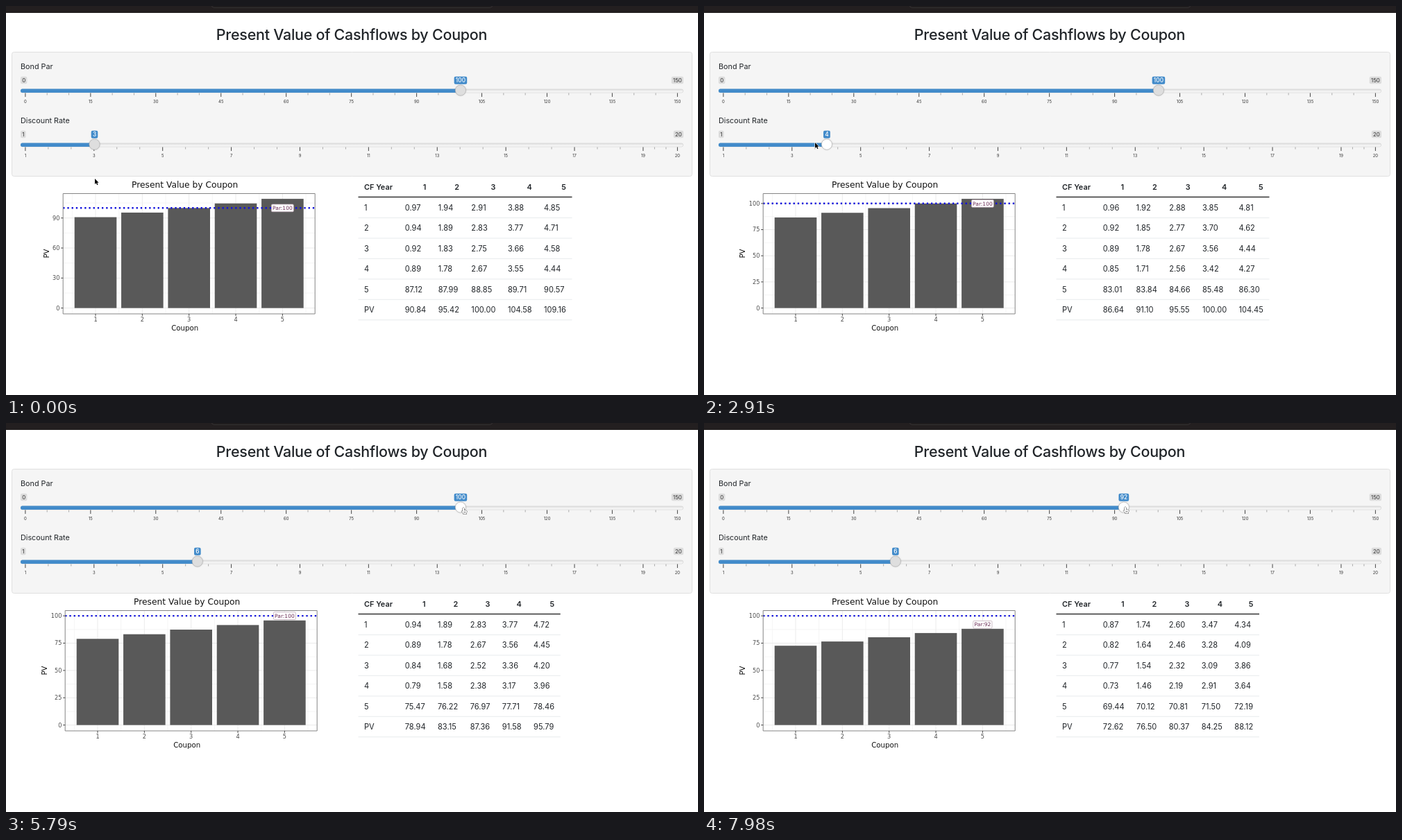
Write an HTML page with a canvas that moves like this. It is 997 px wide and 561 px high and loops after 8000 ms.

```html
<!DOCTYPE html>
<html lang="en">
<head>
<meta charset="utf-8">
<title>Present Value of Cashflows by Coupon</title>
<style>
html, body { margin: 0; width: 100%; height: 100%; overflow: hidden; background: #fff; }
canvas { display: block; width: 997px; height: 561px; }
</style>
</head>
<body>
<canvas></canvas>
<script>
const W = 997, H = 561, LOOP = 8000;
const SANS = 'Inter, sans-serif', PLOT = '"DejaVu Sans", sans-serif';
const BLUE = '#428bca';
const canvas = document.querySelector('canvas');
const ctx = canvas.getContext('2d');
const ratio = window.devicePixelRatio || 1;
canvas.width = Math.round(W * ratio);
canvas.height = Math.round(H * ratio);

// Cursor tip: time, x, y
const cursorPath = [
  [510, 128, 249], [1260, 132, 198], [1530, 133, 199], [1890, 133, 199],
  [2070, 155, 197], [2250, 160, 197], [2910, 160, 197], [3510, 217, 200],
  [4080, 217, 200], [4380, 262, 199], [4710, 262, 199], [5490, 655, 124],
  [5790, 658, 121], [6060, 658, 121], [6300, 620, 120], [7020, 620, 120],
  [7440, 609, 120], [7910, 609, 120], [7980, 606, 120]
];
// Recomputed results: time, discount rate, par
const results = [
  [0, 3, 100], [2610, 4, 100], [3840, 5, 100],
  [4740, 6, 100], [6630, 6, 94], [7650, 6, 92]
];

const parSlider = {
  name: 'Bond Par', y: 0, min: 0, max: 150, step: 15,
  grab: 3, drag: [5900, LOOP]
};
const rateSlider = {
  name: 'Discount Rate', y: 78, min: 1, max: 20, step: 2,
  grab: 5.5, drag: [1600, 4700]
};

function cursorAt(t) {
  const next = cursorPath.findIndex(key => key[0] > t);
  if (next === 0) return cursorPath[0].slice(1);
  if (next < 0) return cursorPath[cursorPath.length - 1].slice(1);
  const [t0, x0, y0] = cursorPath[next - 1], [t1, x1, y1] = cursorPath[next];
  const p = (t - t0) / (t1 - t0), e = p * p * (3 - 2 * p);
  return [x0 + (x1 - x0) * e, y0 + (y1 - y0) * e];
}

function text(str, x, midY, size, { align = 'left', weight = 400, color = '#212529', font = SANS } = {}) {
  ctx.font = `${weight} ${size}px ${font}`;
  ctx.textAlign = align;
  ctx.fillStyle = color;
  ctx.fillText(str, x, midY + size * 0.364);
}

function line(x0, y0, x1, y1, color, width = 1) {
  ctx.strokeStyle = color;
  ctx.lineWidth = width;
  ctx.beginPath();
  ctx.moveTo(x0, y0);
  ctx.lineTo(x1, y1);
  ctx.stroke();
}

function box(x, y, w, h, radius, fill, stroke, width = 1) {
  ctx.beginPath();
  ctx.roundRect(x, y, w, h, radius);
  if (fill) { ctx.fillStyle = fill; ctx.fill(); }
  if (stroke) { ctx.strokeStyle = stroke; ctx.lineWidth = width; ctx.stroke(); }
}

function badge(value, x, midY, align, fill, color, size, weight) {
  ctx.font = `${weight} ${size}px ${SANS}`;
  const w = ctx.measureText(value).width + 4.4, h = size + 2.8;
  const left = x - w * { left: 0, center: 0.5, right: 1 }[align];
  box(left, midY - h / 2, w, h, 2, fill);
  text(value, left + w / 2, midY, size, { align: 'center', color, weight });
}

function handleX(s, value) {
  return 28.6 + (value - s.min) / (s.max - s.min) * 939.5;
}

function sliderValue(s, t) {
  const [x] = cursorAt(Math.min(Math.max(t, s.drag[0]), s.drag[1]));
  return s.min + Math.round((x - s.grab - 28.6) / 939.5 * (s.max - s.min));
}

function drawSlider(s, t, cursor) {
  const y = s.y, value = sliderValue(s, t), x = handleX(s, value);
  text(s.name, 21, 87 + y, 10.8);
  badge(s.min, 21, 107 + y, 'left', '#dcdcdc', '#333', 7.9, 400);
  badge(s.max, 976, 107 + y, 'right', '#dcdcdc', '#333', 7.9, 400);

  const shade = ctx.createLinearGradient(0, 120 + y, 0, 125 + y);
  shade.addColorStop(0, '#dedede');
  shade.addColorStop(1, '#fff');
  box(21.3, 120 + y, 954.4, 5, 2.5, shade, '#d2d2d2', 0.7);
  box(21, 119.6 + y, x - 21, 5.4, [2.5, 0, 0, 2.5], BLUE);

  for (let v = s.min; v < s.max; v += s.step) drawTicks(s, v, Math.min(v + s.step, s.max));
  drawMajor(s, s.max);

  badge(value, x, 107.2 + y, 'center', BLUE, '#fff', 8.3, 500);
  const hover = Math.hypot(cursor[0] - x, cursor[1] - 121.6 - y) < 8.5;
  const dragging = t > s.drag[0] && t < s.drag[1];
  ctx.save();
  ctx.shadowColor = 'rgba(0,0,0,.25)';
  ctx.shadowBlur = 2 * ratio;
  box(x - 7.6, 114 + y, 15.2, 15.2, 7.6, hover || dragging ? '#fff' : '#dedede');
  ctx.restore();
  box(x - 7.6, 114 + y, 15.2, 15.2, 7.6, null, '#b4b4b4', 0.7);
  return hover;
}

function drawMajor(s, v) {
  const x = handleX(s, v) - 0.7;
  line(x, 125.5 + s.y, x, 131 + s.y, '#333', 0.9);
  text(v, x, 138 + s.y, 5.9, { align: 'center', color: '#333' });
}

function drawTicks(s, from, to) {
  drawMajor(s, from);
  for (const part of [1, 2]) {
    const x = handleX(s, from + (to - from) * part / 3) - 0.7;
    line(x, 125.5 + s.y, x, 128.5 + s.y, '#888', 0.7);
  }
}

// Present values of each year's cashflow plus their sum, per coupon
function cashflows(rate, par) {
  return [1, 2, 3, 4, 5].map(coupon => {
    const flows = [1, 2, 3, 4, 5].map(year =>
      par * (coupon / 100 + (year === 5 ? 1 : 0)) / (1 + rate / 100) ** year);
    return [...flows, flows.reduce((a, b) => a + b)];
  });
}

function drawTable(columns) {
  const size = 11.1, gap = 17.4, rowY = i => 291 + i * 29.45;
  text('CF Year', 516, 261, 10.9, { weight: 600 });
  ['1', '2', '3', '4', '5', 'PV'].forEach((label, i) => text(label, 516, rowY(i), size));
  let x = 574.7;
  columns.forEach((column, c) => {
    const cells = column.map(v => v.toFixed(2));
    ctx.font = `400 ${size}px ${SANS}`;
    const width = Math.max(...cells.map(cell => ctx.measureText(cell).width));
    text(c + 1, x + width, 261, 10.9, { align: 'right', weight: 600 });
    cells.forEach((cell, i) => text(cell, x, rowY(i), size));
    x += width + gap;
  });
  const right = x - gap / 2;
  line(507.5, 275.5, right, 275.5, '#333', 1.5);
  for (let i = 0; i < 6; i++) line(507.5, rowY(i) + 14.5, right, rowY(i) + 14.5, '#e3e6e9', 0.8);
}

function drawChart(rate, par, totals) {
  const left = rate > 3 ? 85.2 : 82.2, top = 270.5, width = 363, height = 173.5;
  const right = left + width, bottom = top + height, mid = left + width / 2;
  const max = Math.max(100, ...totals), step = max > 108 ? 30 : 25;
  const px = v => left + (v - 0.305) * width / 5.39;
  const py = v => 435.6 - v / max * 157.5;
  const label = (str, x, y, size, align, color) =>
    text(str, x, y, size, { align, color, font: PLOT });

  for (let v = 0.5; v <= 5.5; v += 0.5)
    line(px(v), top, px(v), bottom, '#ebebeb', v % 1 ? 0.5 : 1);
  for (let v = 0; py(v) > top; v += step / 2)
    line(left, py(v), right, py(v), '#ebebeb', v % step ? 0.5 : 1);

  ctx.fillStyle = '#595959';
  totals.forEach((v, i) =>
    ctx.fillRect(px(i + 0.55), py(v), px(0.9) - px(0), py(0) - py(v)));

  ctx.setLineDash([2.3, 3.9]);
  line(left, py(100), right, py(100), '#1010dc', 2.4);
  ctx.setLineDash([]);
  box(left, top, width, height, 0, null, '#858585', 1);

  const tag = 'Par:' + par;
  ctx.font = `7.5px ${PLOT}`;
  const tagWidth = ctx.measureText(tag).width + 3.4;
  box(px(5) - tagWidth / 2, py(par) - 5.4, tagWidth, 10.8, 1.5, '#fff', '#b9a3b0', 0.7);
  label(tag, px(5), py(par), 7.5, 'center', '#6b2b55');

  for (let v = 0; v <= max; v += step) {
    line(left - 3, py(v), left, py(v), '#333', 0.9);
    label(v, left - 4.7, py(v), 8.2, 'right', '#4d4d4d');
  }
  for (let v = 1; v <= 5; v++) {
    line(px(v), bottom, px(v), bottom + 3, '#333', 0.9);
    label(v, px(v), 452, 8.2, 'center', '#4d4d4d');
  }
  label('Present Value by Coupon', mid - 6, 258, 12.25, 'center', '#111');
  label('Coupon', mid - 6, 464.7, 10.2, 'center', '#111');
  ctx.save();
  ctx.translate(rate > 3 ? 55.7 : 58, 357);
  ctx.rotate(-Math.PI / 2);
  label('PV', 0, 0, 10.2, 'center', '#111');
  ctx.restore();
}

const arrow = new Path2D('M0 0V8L1.9 6.3L3.2 9.2L4.5 8.6L3.2 5.8H5.6Z');
const hand = new Path2D('M0 1.6Q1 .2 2 1.6V4.8L5 5.3Q6.2 5.6 6 6.8L5.4 8.8V10.4H.8V9.2L-1.8 6.6Q-1.8 5.4 0 6.4Z');

function drawCursor([x, y], isHand) {
  ctx.save();
  ctx.translate(x, y);
  ctx.lineJoin = 'round';
  ctx.lineWidth = isHand ? 0.9 : 1.2;
  ctx.strokeStyle = isHand ? '#222' : '#fff';
  ctx.fillStyle = isHand ? '#fff' : '#000';
  const shape = isHand ? hand : arrow;
  ctx.stroke(shape);
  ctx.fill(shape);
  if (isHand) {
    ctx.lineWidth = 0.6;
    ctx.stroke(new Path2D('M2 6.6V8.6M3.6 6.6V8.6'));
  }
  ctx.restore();
}

function draw(t) {
  ctx.setTransform(ratio, 0, 0, ratio, 0, 0);
  ctx.fillStyle = '#fff';
  ctx.fillRect(0, 0, W, H);
  ctx.fillStyle = '#231f20';
  ctx.fillRect(0, 0, W, 10);
  box(296, -16, 405, 18.3, 4, '#1e1b1c', '#3d393a', 0.8);

  ctx.letterSpacing = '-0.27px';
  text('Present Value of Cashflows by Coupon', 498, 41, 21.5, { align: 'center', weight: 500 });
  ctx.letterSpacing = '0px';
  box(8.5, 66.5, 980, 179, 3, '#f5f5f5', '#e0e0e0', 1);

  const cursor = cursorAt(t);
  const overPar = drawSlider(parSlider, t, cursor);
  const overRate = drawSlider(rateSlider, t, cursor);

  const [, rate, par] = results.filter(r => r[0] <= t).pop();
  const columns = cashflows(rate, par);
  drawChart(rate, par, columns.map(column => column[5]));
  drawTable(columns);
  drawCursor(cursor, overPar || overRate);
}

const start = performance.now();
function tick() {
  draw((performance.now() - start) % LOOP);
  requestAnimationFrame(tick);
}
tick();
</script>
</body>
</html>
```
